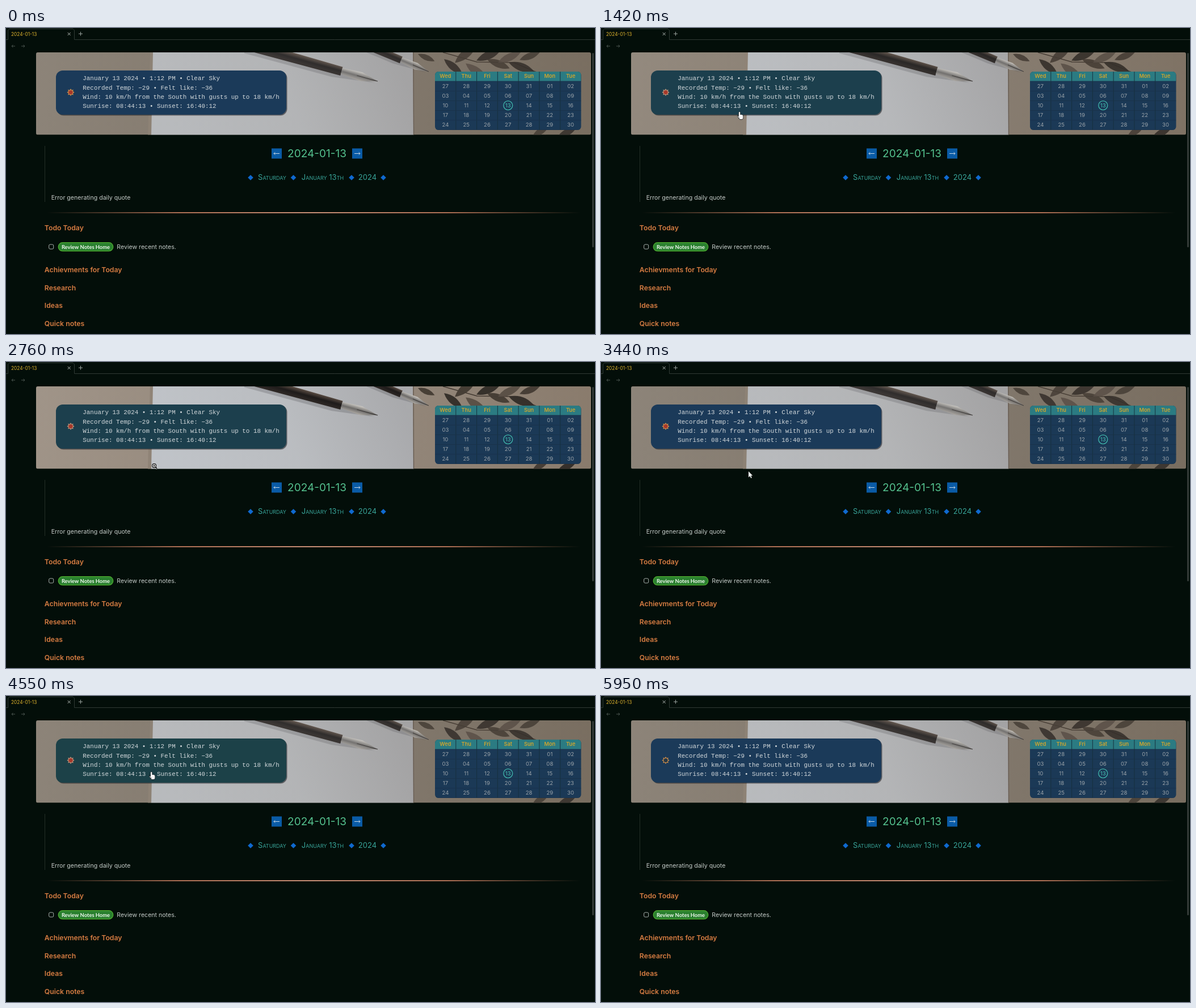
These frames come from a looping animation (1038 by 540 pixels, 6.55 s). An HTML page with a canvas:

```html
<!DOCTYPE html>
<html lang="en">
<head>
<meta charset="utf-8">
<title>Daily note</title>
<style>
  html, body { margin: 0; width: 100%; height: 100%; overflow: hidden; background: #030e09; }
  canvas { display: block; }
</style>
</head>
<body>
<canvas id="stage" width="1038" height="540"></canvas>
<script>
const ctx = document.getElementById('stage').getContext('2d');
const LOOP = 6550, STEP = 70, BG = '#030e09';
const SANS = 'Inter, sans-serif', MONO = '"Liberation Mono", monospace';
const BANNER = { x: 53, y: 43, w: 978, h: 145.5 };
const PANEL_BOTTOM = 153, BANNER_BOTTOM = 188;

// Pointer moves: a curve through an optional bend, slowing down by a power
const MOVES = [
  { start: 510, end: 1140, from: [866, 519], bend: [250, 310], to: [241, 201], power: 1.4 },
  { start: 1210, end: 1820, from: [241, 194], to: [245, 130], power: 3 },
  { start: 2410, end: 2970, from: [245, 130], to: [262, 186], power: 3 },
  { start: 3230, end: 3440, from: [262, 186], to: [260, 193], power: 1 },
  { start: 3440, end: 3720, from: [260, 193], to: [256, 134], power: 1.5 },
  { start: 4550, end: 5180, from: [256, 134], bend: [270, 195], to: [308, 253], power: 1 },
  { start: 5250, end: 5880, from: [314, 257], to: [1004, 535], power: 1 }
];

const clamp = v => Math.min(1, Math.max(0, v));
const lerp = (a, b, k) => a + (b - a) * k;
const moveAt = t => MOVES.findLast(m => t >= m.start);

// Rises from a and is gone again at b
const pulse = (t, a, b, ramp) => clamp(Math.min(t - a, b - t) / ramp);

const glow = t => .35 * pulse(t, 1210, 1820, 210) + pulse(t, 2410, 3440, 280)
  + .4 * pulse(t, 3440, 3860, 140) + .5 * pulse(t, 4550, 5180, 210);
const tint = t => .7 * pulse(t, 1210, 3440, 140) + pulse(t, 3580, 5180, 140);

function pointerAt(t) {
  const m = moveAt(t);
  const u = 1 - (1 - clamp((t - m.start) / (m.end - m.start))) ** m.power;
  return m.from.map((a, i) => {
    const b = m.to[i], c = m.bend ? m.bend[i] : (a + b) / 2;
    return lerp(lerp(a, c, u), lerp(c, b, u), u);
  });
}

function seeded(seed) {
  return () => (seed = seed * 16807 % 2147483647) / 2147483647;
}

function text(s, x, y, font, color, align = 'left') {
  ctx.font = font;
  ctx.fillStyle = color;
  ctx.textAlign = align;
  ctx.fillText(s, x, y);
}

function box(x, y, w, h, r, fill, stroke, lw = 1) {
  ctx.beginPath();
  ctx.roundRect(x, y, w, h, r);
  if (fill) { ctx.fillStyle = fill; ctx.fill(); }
  if (stroke) { ctx.strokeStyle = stroke; ctx.lineWidth = lw; ctx.stroke(); }
}

function disc(x, y, r, fill, stroke, lw) {
  box(x - r, y - r, 2 * r, 2 * r, r, fill, stroke, lw);
}

function line(color, lw, ...p) {
  ctx.beginPath();
  for (let i = 0; i < p.length; i += 2) ctx.lineTo(p[i], p[i + 1]);
  ctx.strokeStyle = color;
  ctx.lineWidth = lw;
  ctx.stroke();
}

function poly(fill, ...p) {
  ctx.beginPath();
  for (let i = 0; i < p.length; i += 2) ctx.lineTo(p[i], p[i + 1]);
  ctx.closePath();
  ctx.fillStyle = fill;
  ctx.fill();
}

function ramp(x0, y0, x1, y1, ...stops) {
  const g = ctx.createLinearGradient(x0, y0, x1, y1);
  stops.forEach((c, i) => g.addColorStop(i / (stops.length - 1), c));
  return g;
}

function arrow(x, y, r, head, dir, color, lw) {
  const tip = x + r * dir, back = tip - head * dir;
  line(color, lw, x - r * dir, y, tip, y);
  line(color, lw, back, y - head, tip, y, back, y + head);
}

// A pen lying along a slope, its nib tip at the given point
function pen(x, y, angle, size) {
  ctx.save();
  ctx.translate(x, y);
  ctx.rotate(angle);
  ctx.scale(size, size);
  poly('rgba(70,70,75,.25)', -4, 4, -80, 14, -240, 15, -240, 8);
  poly(ramp(0, -9, 0, 8, '#5a4c42', '#1b1817', '#2c2623'), -66, -8, -240, -10, -240, 9, -66, 8);
  poly(ramp(0, -8, 0, 8, '#cfccc6', '#6b6967', '#b0aca6'), -66, -6, -30, -8, 0, 0, -30, 8, -66, 5);
  line('#2e2b29', 1, -38, 0, 0, 0);
  ctx.restore();
}

function leaf(x, y, len, angle, color) {
  ctx.save();
  ctx.translate(x, y);
  ctx.rotate(angle);
  ctx.beginPath();
  ctx.moveTo(0, 0);
  ctx.quadraticCurveTo(len / 2, -len * .3, len, 0);
  ctx.quadraticCurveTo(len / 2, len * .3, 0, 0);
  ctx.fillStyle = color;
  ctx.fill();
  ctx.restore();
}

function foliage() {
  const rnd = seeded(41), shades = ['#352f2a', '#463e36', '#5a5047'];
  const sprig = (x, y, count, gap) => {
    for (let i = 0; i < count; i++) {
      const up = i % 2 ? -1 : 1;
      leaf(x + i * gap, y + rnd() * 8, 36 + rnd() * 16, up * (.3 + rnd() * .4), shades[i % 3]);
    }
  };
  line('#40372f', 1.5, 770, 43, 830, 60, 895, 61, 935, 78);
  sprig(772, 55, 8, 19);
  sprig(905, 186, 4, 22);
  leaf(726, 46, 32, .4, shades[1]);
}

function photo(level) {
  const { x, y, w, h } = BANNER;
  ctx.save();
  box(x, y, w, h, 3);
  ctx.clip();
  ctx.globalAlpha = .86 + .12 * level;
  ctx.fillStyle = ramp(x, y, x + w, y + h, '#a3978b', '#998c7f', '#95887b', '#8c7d6e');
  ctx.fillRect(x, y, w, h);
  poly('#8f8376', 254, 43, 259, 43, 256, 189, 250, 189);
  poly(ramp(300, 188, 690, 43, '#c0c4c9', '#bbbec2', '#a9aaad'), 259, 43, 717, 43, 718, 189, 256, 189);
  line('#62574d', 1.3, 718, 43, 718.5, 189);
  pen(655, 94, .27, 1);
  pen(745, 77, .4, .8);
  foliage();
  ctx.restore();
}

function sun(t, k) {
  const x = 114, y = 113.5;
  ctx.beginPath();
  for (let i = 0; i < 16; i++) {
    const r = i % 2 ? 4.4 : 6.6, a = i * Math.PI / 8;
    ctx.lineTo(x + r * Math.cos(a), y + r * Math.sin(a));
  }
  ctx.closePath();
  ctx.fillStyle = k > .3 ? '#b88e76' : '#c98a4a';
  ctx.fill();
  disc(x, y, 3.6, t >= 4830 ? '#263846' : '#a8382a');
}

function weather(t) {
  const k = tint(t), mix = (a, b) => Math.round(lerp(a, b, k));
  box(89.5, 76.5, 406, 78, 12, 'rgba(25,25,30,.55)');
  box(88, 75, 406, 78, 12, `rgb(${mix(27, 28)},${mix(58, 65)},${mix(89, 72)})`);
  sun(t, k);
  ['January 13 2024 • 1:12 PM • Clear Sky',
   'Recorded Temp: −29 • Felt like: −36',
   'Wind: 10 km/h from the South with gusts up to 18 km/h',
   'Sunrise: 08:44:13 • Sunset: 16:40:12'
  ].forEach((s, i) => text(s, 135.3, 92.3 + i * 16.35, '10.9px ' + MONO, '#d3d9dc'));
}

function calendar() {
  const x = 756, y = 77, w = 257.5, h = 103, col = w / 7, row = 17.15;
  ctx.save();
  box(x, y, w, h, 6, '#1b3956');
  ctx.clip();
  ctx.fillStyle = '#2b7b82';
  ctx.fillRect(x, y, w, 17);
  for (let i = 1; i < 7; i++) {
    line('#17313f', 1, x + i * col, y, x + i * col, y + h);
    line('#19324b', 1, x, y + i * row, x + w, y + i * row);
  }
  ctx.restore();
  ['Wed', 'Thu', 'Fri', 'Sat', 'Sun', 'Mon', 'Tue'].forEach((d, i) =>
    text(d, x + (i + .5) * col, 88.2, '600 9.2px ' + SANS, '#d0a52e', 'center'));
  for (let i = 0; i < 35; i++) {
    const n = (i + 26) % 31 + 1, today = n === 13;
    const cx = x + (i % 7 + .5) * col, cy = 102.3 + Math.floor(i / 7) * row;
    text(String(n).padStart(2, '0'), cx, cy + 3.5, '9.6px ' + SANS, today ? '#45c0b2' : '#98a1a8', 'center');
    if (today) disc(cx, cy, 8, null, '#3fb5ab', 1.3);
  }
}

function chrome() {
  line('#303a35', 1, 0, 20.5, 3.5, 20.5, 3.5, 4, 6, 1.5, 118, 1.5, 120.5, 4, 120.5, 20.5, 1038, 20.5);
  text('2024-01-13', 9, 13.6, '8.3px ' + SANS, '#e2b52d');
  for (const d of [-2.5, 2.5]) line('#b4bbb7', 1, 111.2 - d, 8, 111.2 + d, 13);
  line('#9aa39e', 1, 128, 10.2, 135, 10.2);
  line('#9aa39e', 1, 131.5, 6.7, 131.5, 13.7);
  arrow(13, 32, 3, 2.3, -1, '#4c5751', 1);
  arrow(30, 32, 3, 2.3, 1, '#4c5751', 1);
  box(1033, 44, 3, 343, 1.5, '#343b38');
}

function title() {
  line('#222d27', 1, 68.5, 208, 68.5, 307);
  for (const dir of [-1, 1]) {
    const x = 548 + 71 * dir;
    box(x - 9, 212.5, 18, 18, 0, '#0a5ba6');
    arrow(x, 221.5, 5, 2.2, dir, '#c6d6e4', 1);
  }
  text('2024-01-13', 548, 228.2, '19px ' + SANS, '#55c28f', 'center');
  const caps = (s, x) => text(s, x, 268.3, 'small-caps 13px ' + SANS, '#38a499', 'center');
  caps('Saturday', 469);
  caps('January 13th', 558);
  caps('2024', 637);
  for (const x of [431, 506.5, 609, 665])
    poly('#0f69cf', x - 4.8, 264, x, 259.2, x + 4.8, 264, x, 268.8);
}

function note() {
  const body = (s, x, y) => text(s, x, y, '10.6px ' + SANS, '#c5cbc8');
  const heading = (s, y) => text(s, 67.8, y, '600 12.25px ' + SANS, '#d67c42');

  body('Error generating daily quote', 79.7, 302.8);
  const edge = 'rgba(214,134,102,0)', mid = 'rgba(214,134,102,.9)';
  ctx.fillStyle = ramp(72, 0, 1012, 0, edge, mid, '#dc9c82', mid, edge);
  ctx.fillRect(72, 325, 940, 1.8);

  heading('Todo Today', 356.6);
  box(75.7, 382, 8, 8, 2, null, '#a9b1ad', 1);
  box(92.2, 378.7, 96.6, 15, 7.5, '#2a802f', '#4fae2f', 1.2);
  text('Review Notes Home', 140.5, 389.6, '700 9.4px Lato, sans-serif', '#eef5ee', 'center');
  body('Review recent notes.', 195.3, 390);
  ['Achievments for Today', 'Research', 'Ideas', 'Quick notes']
    .forEach((s, i) => heading(s, 431.4 + i * 31.5));
}

function hand() {
  ctx.beginPath();
  ctx.roundRect(-1, 0, 2.4, 9, 1.2);
  ctx.roundRect(-1, 5, 7.4, 8, 2.5);
  ctx.moveTo(-1, 9);
  ctx.lineTo(-3, 6.7);
  ctx.lineTo(-2.6, 9);
  ctx.lineTo(1, 13);
  ctx.strokeStyle = '#15191b';
  ctx.lineWidth = 1.2;
  ctx.stroke();
  ctx.fillStyle = '#f5f5f5';
  ctx.fill();
}

function magnifier() {
  line('#f0f0f0', 3.2, 2, 2, 5.2, 5.2);
  line('#111', 1.8, 2, 2, 5, 5);
  disc(0, 0, 3.4, '#f0f0f0', '#111', 1.2);
  line('#111', 1, -1.8, 0, 1.8, 0);
  line('#111', 1, 0, -1.8, 0, 1.8);
}

function pick() {
  poly('#f2f4f3', 0, 0, 0, 10.5, 2.5, 8.2, 4.2, 12, 5.8, 11.3, 4.2, 7.6, 7.3, 7.4);
}

function pointer(x, y) {
  ctx.save();
  ctx.translate(x, y);
  (y < PANEL_BOTTOM ? hand : y < BANNER_BOTTOM ? magnifier : pick)();
  ctx.restore();
}

function draw(t) {
  ctx.fillStyle = BG;
  ctx.fillRect(0, 0, 1038, 540);
  chrome();
  photo(glow(t));
  weather(t);
  calendar();
  title();
  note();
  if (t >= 510 && t < 5950) pointer(...pointerAt(t));
}

function frame(now) {
  const t = now % LOOP, start = moveAt(t)?.start ?? 0;
  // Hold each pose for one step, counted from the start of its move
  draw(start + Math.floor((t - start) / STEP) * STEP);
  requestAnimationFrame(frame);
}
requestAnimationFrame(frame);
</script>
</body>
</html>
```
